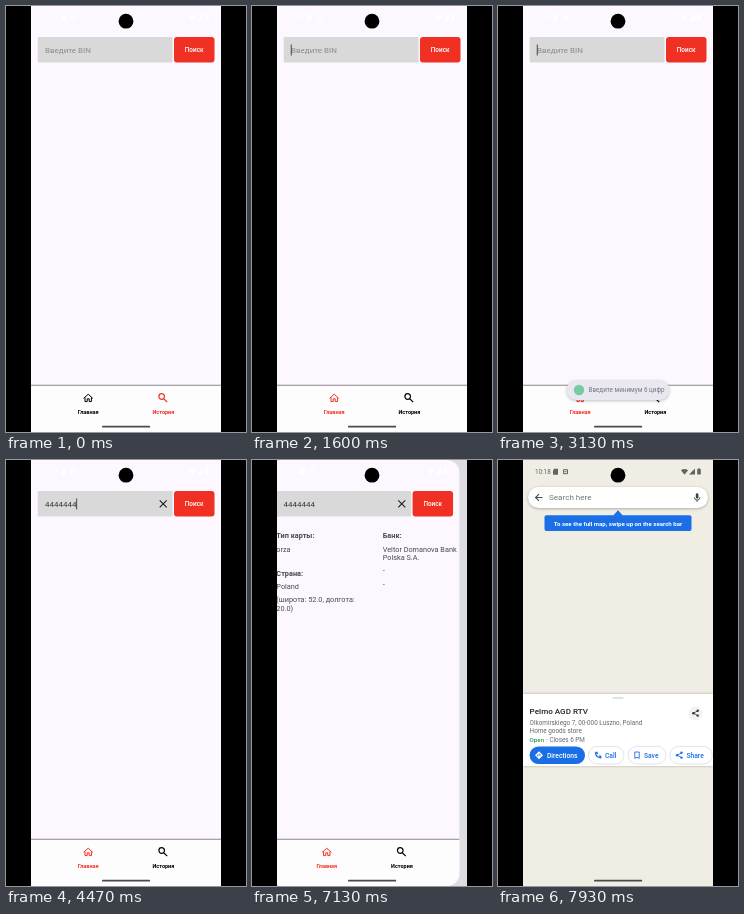
Recreate the animation shown at these times as an HTML page with a canvas. Size 240x426 px, loop 8 s.

```html
<!DOCTYPE html>
<html lang="ru">
<head>
<meta charset="utf-8">
<style>
html, body { margin: 0; width: 100%; height: 100%; overflow: hidden; background: #000; }
canvas { display: block; width: 240px; height: 426px; }
</style>
</head>
<body>
<canvas id="stage"></canvas>
<script>
const LOOP = 8000;
const RED = '#f03022', BLUE = '#1a6ee6', INK = '#4c494f', DARK = '#1c1b1f';
const canvas = document.getElementById('stage');
const dpr = window.devicePixelRatio || 1;
canvas.width = 240 * dpr;
canvas.height = 426 * dpr;
const ctx = canvas.getContext('2d');

const clamp = v => Math.max(0, Math.min(1, v));
const progress = (t, start, length) => clamp((t - start) / length);
const easeOut = p => 1 - Math.pow(1 - p, 3);
const between = (t, a, b) => t >= a && t < b;

function rect(x, y, w, h, color, r = 0) {
  ctx.fillStyle = color;
  ctx.beginPath();
  ctx.roundRect(x, y, w, h, r);
  ctx.fill();
}

function disc(x, y, r, color) {
  ctx.fillStyle = color;
  ctx.beginPath();
  ctx.arc(x, y, r, 0, Math.PI * 2);
  ctx.fill();
}

function text(str, x, y, size, color, weight = 400, align = 'left') {
  ctx.font = `${weight} ${size}px Roboto, sans-serif`;
  ctx.textAlign = align;
  ctx.fillStyle = color;
  ctx.fillText(str, x, y);
}

function stroke(d, x, y, color, width = 1) {
  ctx.save();
  ctx.translate(x, y);
  ctx.strokeStyle = color;
  ctx.lineWidth = width;
  ctx.stroke(new Path2D(d));
  ctx.restore();
}

function fill(d, x, y, color) {
  ctx.save();
  ctx.translate(x, y);
  ctx.fillStyle = color;
  ctx.fill(new Path2D(d));
  ctx.restore();
}

function shadowed(blur, dy, alpha, draw) {
  ctx.save();
  ctx.shadowColor = `rgba(0,0,0,${alpha})`;
  ctx.shadowBlur = blur * dpr;
  ctx.shadowOffsetY = dy * dpr;
  draw();
  ctx.restore();
}

function faded(alpha, draw) {
  if (alpha <= 0) return;
  ctx.save();
  ctx.globalAlpha *= alpha;
  draw();
  ctx.restore();
}

function statusBar(color) {
  text('10:18', 37, 14, 6.3, color);
  fill('M-2-3H2V3H-3V-1Z', 58, 11.7, color);
  stroke('M-2-2H2V2H-2ZM-1 0H1', 67.5, 11.7, color);
  fill('M-3.6-1.5Q0-4.2 3.6-1.5L0 3Z', 186.5, 11.8, color);
  fill('M3-3V3H-3Z', 194, 11.6, color);
  rect(199.2, 9, 3.6, 5.6, color, 0.6);
  rect(200.2, 8.3, 1.6, 1, color);
}

function tabs(historyActive) {
  const home = historyActive ? '#000' : RED;
  const history = historyActive ? RED : '#000';
  rect(25, 379, 190, 47, '#fefdfe');
  rect(25, 378.7, 190, 1, '#8d8791');
  stroke('M-4.6 .4L0-3.8L4.6 .4M-3.2-.6V3.6H-1V.8H1V3.6H3.2V-.6', 82.2, 392, home);
  stroke('M1.7-1.3A2.8 2.8 0 1 1-3.9-1.3A2.8 2.8 0 1 1 1.7-1.3M.9 .9L4.4 4.3', 156.8, 391.8, history, 1.2);
  text('Главная', 82.2, 408.2, 5.5, home, 700, 'center');
  text('История', 157.4, 408.2, 5.5, history, 700, 'center');
}

function cursorVisible(t) {
  const spans = [[1170, 1640], [2170, 2670], [3100, 4030], [4440, 4970],
                 [5470, 5900], [6170, 6690]];
  return spans.some(([a, b]) => between(t, a, b));
}

function ripple(t, start) {
  const p = progress(t, start, 500);
  if (p <= 0 || p >= 1) return;
  ctx.save();
  ctx.beginPath();
  ctx.roundRect(168, 31, 40.5, 25.4, 3);
  ctx.clip();
  disc(188, 44, 6 + 19 * easeOut(p), `rgba(255,255,255,${0.16 * (1 - p)})`);
  ctx.restore();
}

function searchForm(t) {
  const typed = Math.min(7, Math.max(0, Math.floor((t - 3170) / 58)));
  rect(31.7, 31, 134.8, 25.4, '#d9d9d9', 0.8);
  if (typed) {
    text('4'.repeat(typed), 39, 46.9, 8, '#3a383c');
    stroke('M-3.5-3.5L3.5 3.5M3.5-3.5L-3.5 3.5', 157.2, 43.8, DARK, 1.1);
  } else {
    text('Введите BIN', 39, 46.9, 8, '#8b8b8d');
  }
  if (cursorVisible(t)) rect(38.8 + typed * 4.49, 38.4, 0.9, 11, '#39363c');
  rect(168, 31, 40.5, 25.4, RED, 3);
  ripple(t, 2230);
  ripple(t, 5000);
  text('Поиск', 188.2, 46.2, 6.4, '#fff', 500, 'center');
}

function results() {
  const lines = (x, y, rows) => rows.forEach((row, i) => text(row, x, y + i * 8.55, 7.3, INK));
  text('Тип карты:', 31.8, 78.2, 7.3, INK, 700);
  lines(31.8, 91.6, ['orza']);
  text('Страна:', 31.8, 115.6, 7.3, INK, 700);
  lines(31.8, 129, ['Poland']);
  lines(31.8, 142.2, ['(широта: 52.0, долгота:', '20.0)']);
  text('Банк:', 138.2, 78.2, 7.3, INK, 700);
  lines(138.2, 91.6, ['Veltor Domanova Bank', 'Polska S.A.']);
  lines(138.2, 113.2, ['-']);
  lines(138.2, 126.6, ['-']);
}

function toast(t) {
  const alpha = Math.min(progress(t, 2500, 300), 1 - progress(t, 3470, 300));
  faded(alpha, () => {
    shadowed(3, 1, 0.25, () => rect(68.5, 374.2, 103, 19.8, '#e9e7ef', 9.9));
    disc(81, 384, 5.2, '#79c9a3');
    text('Введите минимум 6 цифр', 90.5, 386.3, 6.3, '#77757e');
  });
}

function cardApp(t) {
  const onHistory = between(t, 130, 660);
  rect(25, 0, 190, 426, '#fdf7ff');
  statusBar('#fff');
  if (!onHistory) searchForm(t);
  faded(progress(t, 5330, 250), results);
  tabs(t < 600);
  toast(t);
}

function pill(x, w, label, labelX, solid) {
  ctx.beginPath();
  ctx.roundRect(x, 286.4, w, 17.6, 8.8);
  if (solid) {
    ctx.fillStyle = BLUE;
    ctx.fill();
  } else {
    ctx.strokeStyle = '#d3d8e0';
    ctx.lineWidth = 0.7;
    ctx.stroke();
  }
  text(label, labelX, 297.5, 6.7, solid ? '#fff' : BLUE, 500);
}

function shareIcon(x, y, color) {
  stroke('M2.2-2.3L-2.2 0L2.2 2.3', x, y, color, 0.8);
  disc(x - 2.2, y, 1.2, color);
  disc(x + 2.2, y - 2.4, 1.2, color);
  disc(x + 2.2, y + 2.4, 1.2, color);
}

function placeSheet() {
  shadowed(3, -0.5, 0.4, () => rect(25, 234, 190, 72, '#fff'));
  rect(114.5, 237.4, 11, 1.2, '#c4c6c9', 0.6);
  text('Pelmo AGD RTV', 31.6, 254, 8.1, '#202124', 500);
  disc(197.5, 253.2, 7, '#f1f2f4');
  shareIcon(197.5, 253.2, '#333');
  text('Olkomirskiego 7, 00-000 Łuszno, Poland', 31.6, 265, 6.35, '#66696d');
  text('Home goods store', 31.6, 273.3, 6.35, '#66696d');
  text('Open', 31.6, 281.7, 6.2, '#2b9b50', 500);
  text('· Closes 6 PM', 48.2, 281.7, 6.35, '#66696d');
  pill(31.6, 55.4, 'Directions', 49, true);
  fill('M0-4L4 0L0 4L-4 0Z', 41, 295.2, '#fff');
  stroke('M-1.5 1.3V-.3H1.3M.3-1.4L1.5-.3L.3 .8', 41, 295.2, BLUE, 0.7);
  pill(90.4, 35.6, 'Call', 107, false);
  stroke('M-2.6-2.7Q-2.2 2.2 2.7 2.6L2.7 1L1 .6M-2.6-2.7H-1L-.6-1', 100, 295.2, BLUE, 1.3);
  pill(130, 38, 'Save', 146, false);
  stroke('M-2.2-3.2H2.2V3.2L0 2L-2.2 3.2Z', 139, 295.2, BLUE, 0.9);
  pill(171.8, 42.5, 'Share', 188.5, false);
  shareIcon(181.3, 295.2, BLUE);
}

function searchBar() {
  shadowed(3, 0.8, 0.3, () => rect(30, 27, 180, 21, '#fff', 10.5));
  stroke('M3.5 0H-3.2M0-3.4L-3.4 0L0 3.4', 41, 37.5, '#47494d', 1.1);
  text('Search here', 51, 40.4, 8.1, '#73767b');
  rect(197.8, 33.3, 2.6, 5.2, '#3c4043', 1.3);
  stroke('M-2.7-.3A2.7 2.7 0 0 0 2.7-.3M0 2.4V4.3', 199.1, 37.7, '#3c4043', 0.9);
}

function tooltip() {
  rect(46.5, 55.3, 147, 15.8, BLUE, 2);
  fill('M-5 5.5L0 0L5 5.5Z', 120, 50.2, BLUE);
  text('To see the full map, swipe up on the search bar', 120, 65.5, 6.1, '#fff', 700, 'center');
}

function mapApp(t) {
  rect(25, 0, 190, 426, '#f0ede4');
  statusBar('#64645f');
  faded(progress(t, 7400, 130), searchBar);
  const rise = easeOut(progress(t, 7530, 300));
  if (rise > 0) {
    ctx.save();
    ctx.translate(0, 192 * (1 - rise));
    placeSheet();
    ctx.restore();
  }
  faded(progress(t, 7720, 130), tooltip);
}

function render(t) {
  ctx.setTransform(dpr, 0, 0, dpr, 0, 0);
  ctx.fillStyle = '#000';
  ctx.fillRect(0, 0, 240, 426);
  ctx.save();
  ctx.beginPath();
  ctx.rect(25, 0, 190, 426);
  ctx.clip();

  const slide = easeOut(progress(t, 7070, 400));
  if (slide > 0) {
    rect(25, 0, 190, 426, '#dddce3');
    ctx.save();
    ctx.translate(-19 * slide, 0);
    ctx.beginPath();
    ctx.roundRect(25, 0, 190, 426, 13);
    ctx.clip();
    cardApp(t);
    ctx.restore();
    faded(progress(t, 7140, 90), () => {
      ctx.translate(44 * (1 - slide), 0);
      mapApp(t);
    });
  } else {
    cardApp(t);
  }
  rect(96, 419.8, 48.2, 1.7, '#4a494c', 0.85);
  ctx.restore();
  disc(120, 15.2, 7.4, '#000');
}

function tick(now) {
  render(now % LOOP);
  requestAnimationFrame(tick);
}
render(0);
requestAnimationFrame(tick);
</script>
</body>
</html>
```
